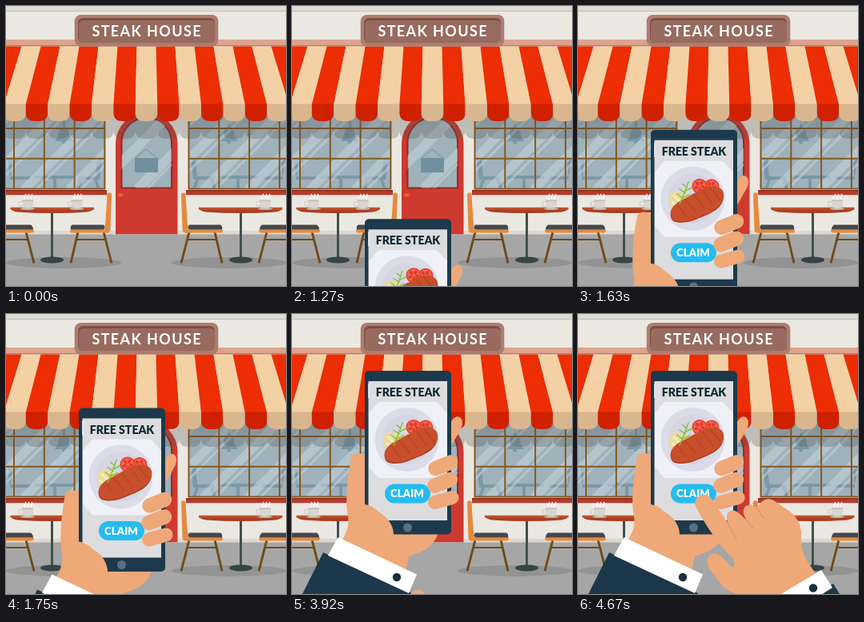
An HTML page for the animation above (4.7 s loop, 350 by 350 pixels).

```html
<!DOCTYPE html>
<html lang="en">
<head>
<meta charset="utf-8">
<title>Steak House</title>
<style>
  html, body { margin: 0; width: 100%; height: 100%; overflow: hidden; background: #a6a6a6; }
  svg { display: block; width: 100%; height: 100%; }
  text { font-family: Lato, "Open Sans", sans-serif; font-weight: 700; text-anchor: middle; }
  .heavy { font-weight: 900; }
</style>
</head>
<body>
<svg viewBox="0 0 350 350">
  <defs>
    <clipPath id="panes"><path d="M0 110H123V229H0zM228.500 110H350V229H228.500z"/></clipPath>
    <clipPath id="doorPane"><path d="M144.500 227.500V171a31.300 31.300 0 0 1 62.600 0V227.500z"/></clipPath>
    <clipPath id="meat"><path id="meatShape" d="M116 180C114 169 124 163 136 157C149 150 157 144 168 143C179 143 185 150 181 160C178 169 168 175 157 179C146 184 138 187 129 187C121 187 117 185 116 180Z"/></clipPath>

    <g id="cup">
      <path d="M-6 -9H-8.500a2.700 2.700 0 0 0 0 5.400H-5" fill="none" stroke="#d5d1cb" stroke-width="1.500"/>
      <path d="M-7 -11H7V-5Q6 0 0 0Q-6 0 -7 -5Z" fill="#d9d5cf"/>
      <path d="M-7 -11H7V-9.500H-7Z" fill="#c3bdb5"/>
      <ellipse cy="0" rx="9" ry="1.300" fill="#c9c4bd"/>
      <path d="M-3 -12.500q-2 -2 0 -3t0 -3M1 -12.500q-2 -2 0 -3t0 -3M5 -12.500q-2 -2 0 -3t0 -3" fill="none" stroke="#fff" stroke-width="1.200"/>
    </g>

    <g id="seating">
      <ellipse cx="72" cy="320.500" rx="72" ry="7" fill="#939393"/>
      <g fill="none" stroke="#6e4a16" stroke-width="2.800">
        <path d="M90 282L81 321M122 282L132 321M25 282L35 321"/>
        <path d="M88 291.500H124M0 291.500H27" stroke-width="2"/>
      </g>
      <path d="M126.500 234q3 -2 5.500 0L130.500 279q0 4 -4 4H123Q125.500 256 126.500 234Z" fill="#e58a3f"/>
      <path d="M80 279H127V283H82Q80 283 80 279ZM0 279H35Q35 283 32 283H0Z" fill="#e58a3f"/>
      <path d="M83 273H122Q125 276 122 279H81Q80 274 83 273ZM0 273H31Q34 275 34 279H0Z" fill="#45484a"/>
      <path d="M56 257H59V317H56Z" fill="#40504f"/>
      <ellipse cx="57.500" cy="317" rx="14.500" ry="4" fill="#354545"/>
      <path d="M5.500 252H110Q110 255 101 257Q58 260 14 257Q5.500 255 5.500 252Z" fill="#a93f22"/>
      <path d="M5.500 251.300H110V254H5.500Z" fill="#bf512b"/>
    </g>

    <g id="interior" fill="#7c98a7">
      <path d="M71 140H74V152Q80 154 80 163L84 169H61L65 163Q65 154 71 152Z"/>
      <circle cx="72.500" cy="170" r="2.500"/>
      <path d="M36 212H86V216H63V229H59V216H36ZM114 191H120L117 217H114L118 229H114L110 217H96L92 229H88L92 213H112ZM8 191H2L5 213H30V217H5Z"/>
    </g>
  </defs>

  <rect width="350" height="290" fill="#ebe8e1"/>
  <path d="M0 0H350V6H0Z" fill="#dedbd5"/>
  <path d="M0 6.500H350" stroke="#c5c1ba"/>
  <path d="M0 42H350V50H0Z" fill="#dca48d"/>
  <path d="M0 49.800H350" stroke="#b97863" stroke-width="1.600"/>
  <path d="M0 285.300H350V350H0Z" fill="#a6a6a6"/>
  <path d="M0 281H350V285.300H0Z" fill="#dcd8d1"/>

  <g clip-path="url(#panes)">
    <rect y="110" width="350" height="120" fill="#9fb1bb"/>
    <use href="#interior"/>
    <use href="#interior" transform="matrix(-1 0 0 1 351 0)"/>
    <g id="shine" stroke="#c4d1d8" opacity=".6"></g>
  </g>
  <g id="frames" fill="none" stroke="#86591e" stroke-width="2"></g>
  <path d="M0 230H126V236.300H0ZM225 230H350V236.300H225Z" fill="#b83c2c"/>
  <path d="M0 230H126V231.500H0ZM225 230H350V231.500H225Z" fill="#8f2b20"/>

  <path d="M137 285.300V172a38.700 38.700 0 0 1 77.500 0V285.300Z" fill="#cf3a30"/>
  <path d="M144.500 227.500V171a31.300 31.300 0 0 1 62.600 0V227.500Z" fill="#9fb1bb" stroke="#912b23" stroke-width="2"/>
  <g clip-path="url(#doorPane)" stroke="#c4d1d8" opacity=".6">
    <path d="M140 200L210 130M164 229L212 181" stroke-width="12"/>
    <path d="M174 231L212 193" stroke-width="3"/>
  </g>
  <path d="M161 191L175 179L190 191" fill="none" stroke="#71909e"/>
  <path d="M161 190H190V208H161Z" fill="#71909e"/>
  <rect x="140" y="234" width="6.500" height="4.500" rx="2" fill="#ee5a25"/>

  <path id="shade" fill="#4c4c48" opacity=".28"/>
  <g id="awning"></g>
  <rect x="85.700" y="11" width="179.600" height="39.500" rx="8" fill="#ad7d70"/>
  <rect x="90" y="15" width="171" height="31" rx="6" fill="#7f4f45"/>
  <path d="M92 46Q91 45 91 42V24Q91 18 97 18H255Q261 18 261 24V40Q261 46 255 46Z" fill="#986b60"/>
  <text x="176.200" y="38" font-size="18" letter-spacing="1.400" fill="#fff">STEAK HOUSE</text>

  <use href="#seating" y=".4"/>
  <use href="#seating" y=".4" transform="matrix(-1 0 0 1 351 0)"/>
  <use href="#cup" x="27" y="253.500"/>
  <use href="#cup" x="88.500" y="253.500"/>
  <use href="#cup" x="324" y="253.500"/>

  <g id="holder">
    <path d="M190 150L200 133Q205 126 210.500 129.500Q215 134 211.500 143L199 165V262H190Z" fill="#efa878"/>
    <path d="M74 178Q80 171 91 176L100 260L183 274Q177 290 162 297L146 303L142 322L62 283Q74 266 69 248Q66 224 74 178Z" fill="#efa878"/>
    <rect x="91" y="71" width="108" height="204.500" rx="5" fill="#1c3a4b"/>
    <rect x="95.500" y="84" width="98.500" height="174" fill="#dddcdf"/>
    <path d="M95.800 87V105" stroke="#fff"/>
    <circle cx="144.500" cy="267" r="5.500" fill="#587080"/>
    <text class="heavy" x="145" y="103" font-size="14" fill="#102c32">FREE STEAK</text>
    <path d="M108 110H181L194 124V191L181 205H108L96 191V124Z" fill="#f0f0f8"/>
    <circle cx="143.500" cy="157" r="40" fill="#dcdce9"/>
    <circle cx="143.500" cy="157" r="31" fill="#d5d5e4"/>
    <path d="M116 151Q120 146 126 149L139 153L132 168L117 169Q113 160 116 151Z" fill="#eadb9b"/>
    <path d="M119 153L130 163M117 161L127 168" stroke="#f6ebbb" stroke-width="3"/>
    <g id="tomatoes"></g>
    <use href="#meatShape" fill="#a93b1d"/>
    <use href="#meatShape" fill="#c84f2b" transform="translate(0 -1.500)"/>
    <path d="M123 163L136 180M133 157L147 174M144 151L158 169M155 146L169 165M165 144L178 159" stroke="#b5431f" stroke-width="1.200" clip-path="url(#meat)"/>
    <path d="M127 164Q133 151 138 136M131 157L124 151M131 156L140 152M134 150L127 145M135 147L143 143M136 143L131 139" fill="none" stroke="#86c232" stroke-width="1.400" stroke-linecap="round"/>
    <rect x="116" y="212.500" width="57" height="24" rx="12" fill="#25bcf0"/>
    <text class="heavy" x="144" y="229" font-size="13" letter-spacing=".2" fill="#fff">CLAIM</text>
    <g stroke="#efa878" stroke-linecap="round" stroke-width="18.500">
      <path d="M179.500 193L198 185.500M178.500 214.500L198 207"/>
      <path d="M178.500 235.500L200 229.500" stroke-width="17"/>
    </g>
    <path d="M70 240L91 238Q100 239 108 247Q127 259 127 276Q127 290 120 300L75 282Z" fill="#efa878"/>
    <path d="M39 298L150 349V630H-127Z" fill="#1d384a"/>
    <path d="M57.500 279L156 325.500L146 349L45 302Z" fill="#fff"/>
    <circle cx="131" cy="329" r="5.200" fill="#172f3e"/>
  </g>

  <g id="tapper">
    <path d="M147 240C144 231 152 225 159 226Q165 227 169 234L187 261Q184 250 190 246Q196 244 201 249L211 258Q203 246 210 240Q217 236 223 242Q229 234 235 231.500Q242 230 249 236L265 247Q277 256 279 272Q278 292 284 305L300 329L260 356H209L182 342L164 318Q159 308 164 302Q171 297 179 303L193 317Q199 312 193 305L179 290Q160 266 147 240Z" fill="#efa878"/>
    <path d="M187 261L198 282M211 258L219 268M223 242L232 255" fill="none" stroke="#dc9361" stroke-width="1.200" stroke-linecap="round"/>
    <circle cx="221.500" cy="236.500" r="3" fill="#d98a4e"/>
    <path d="M276 364L319 337L340 371L296 396Z" fill="#1d384a"/>
    <path d="M254 350L304 320L318 342L268 374Z" fill="#fff"/>
    <circle cx="294" cy="342.500" r="5.200" fill="#172f3e"/>
  </g>
</svg>
<script>
const LOOP = 4700, STEP = 30;
const el = id => document.getElementById(id);

// Awning: stripes fan out from the centre line and end in scallops.
const MID = 175.5, TOP_W = 24, LOW_W = 27.4;
const scallop = (x, y, h) =>
  `M${x} ${y}h${LOW_W}v${h - 11}q0 11 -11 11h${22 - LOW_W}q-11 0 -11 -11z`;
let stripes = '', shade = '';
for (let i = -8; i <= 8; i++) {
  const even = i % 2 === 0;
  const top = MID + (i - .5) * TOP_W, low = MID + (i - .5) * LOW_W;
  stripes += `<path fill="${even ? '#f3d1a5' : '#ed2d03'}" d="M${top} 50.600h${TOP_W}L${low + LOW_W} 123H${low}z"/>` +
    `<path fill="${even ? '#dab68f' : '#cf2100'}" d="${scallop(low, 122.5, 21.5)}"/>`;
  shade += scallop(low, 130, 36);
}
el('awning').innerHTML = stripes;
el('shade').setAttribute('d', shade);

// Window grid and glass reflections
const PANE = 37.8, SHIFT = 218.5;
let grid = '';
for (let i = 0; i < 4; i++) {
  const x = 10 + i * PANE, y = 228.5 - i * PANE;
  grid += `M${x} 125V229M${x + SHIFT} 125V229`;
  if (i < 3) grid += `M0 ${y}H124M228 ${y}H350`;
}
el('frames').innerHTML = `<path d="${grid}"/>`;

let shine = '';
for (let x = -90; x < 350; x += 56) {
  shine += `<path d="M${x} 230l105 -105" stroke-width="11"/>` +
    `<path d="M${x + 15} 230l105 -105" stroke-width="3"/>`;
}
el('shine').innerHTML = shine;

const tomato = (x, y) => {
  let s = `<circle cx="${x}" cy="${y}" r="9.5" fill="#e43a2b"/><circle cx="${x}" cy="${y}" r="8" fill="#f4664f"/>`;
  for (let a = 30; a < 390; a += 72)
    s += `<ellipse cx="${x}" cy="${y - 4.4}" rx="1.9" ry="2.6" fill="#e23a2c" transform="rotate(${a} ${x} ${y})"/>`;
  return s;
};
el('tomatoes').innerHTML = tomato(167, 142) + tomato(152, 141.5);

// Each hand rises at constant speed in small steps, then rests.
function rise(id, t, start, steps, dist) {
  const n = Math.max(0, Math.min(steps, Math.floor((t - start) / STEP + 1e-6)));
  const node = el(id);
  node.setAttribute('transform', `translate(0 ${dist * (1 - n / steps)})`);
  node.setAttribute('visibility', n ? 'visible' : 'hidden');
}

function draw(t) {
  rise('holder', t, 1000, 30, 279);
  rise('tapper', t, 3890, 26, 124);
}

const t0 = performance.now();
function tick() {
  draw((performance.now() - t0) % LOOP);
  requestAnimationFrame(tick);
}
draw(0);
requestAnimationFrame(tick);
</script>
</body>
</html>
```
